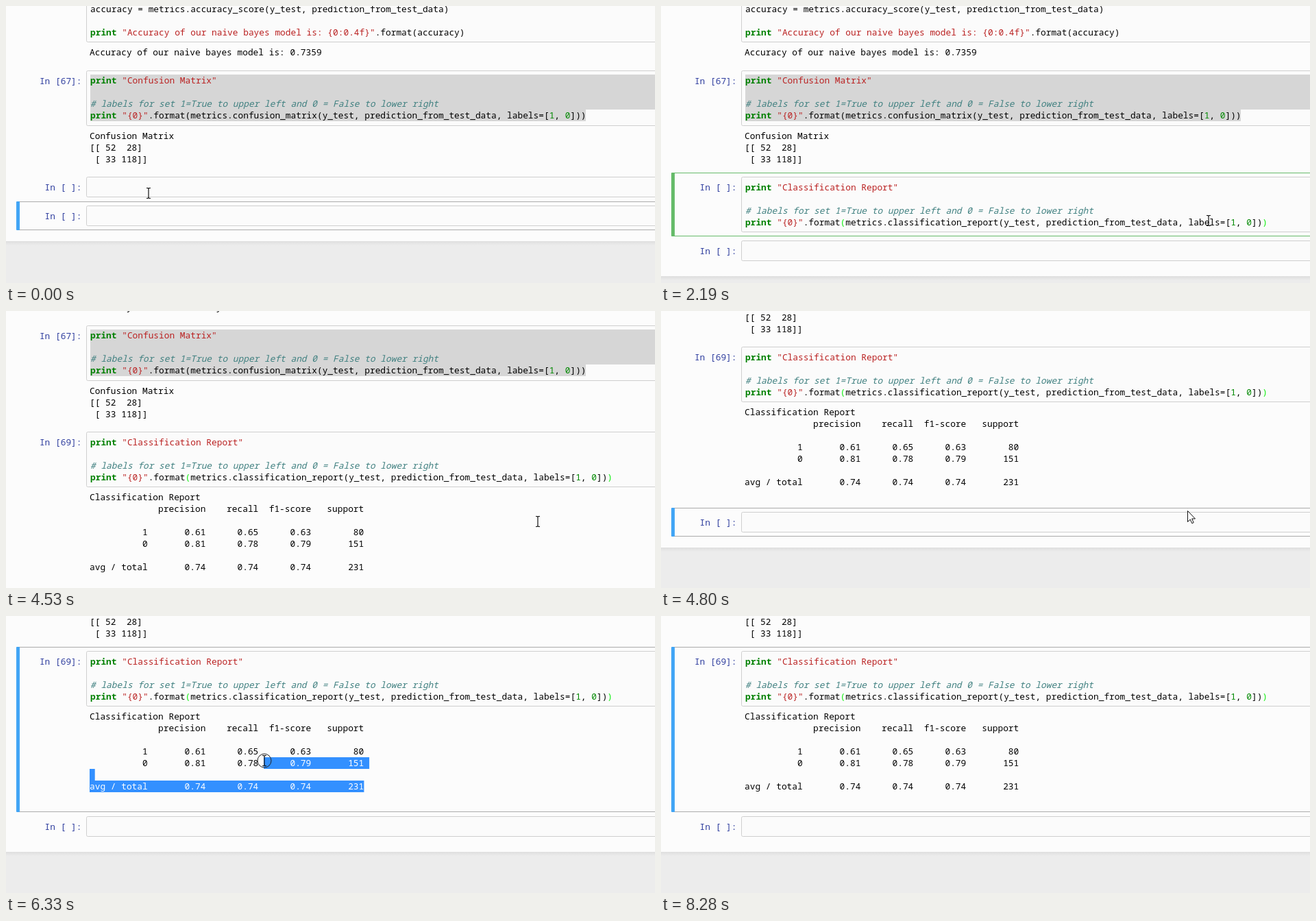
Animation of 947x404 px, one loop 8.69 s. Source, as an HTML page:

```html
<!DOCTYPE html>
<html lang="en">
<head>
<meta charset="utf-8">
<title>Notebook</title>
<style>
  html, body { margin: 0; width: 100%; height: 100%; overflow: hidden; background: #ececec; }
  svg { display: block; width: 947px; height: 404px; }
  text { font: 12.833px "Noto Sans Mono", "DejaVu Sans Mono", monospace; white-space: pre; }
  .prompt { fill: #303f9f; text-anchor: end; }
  .box { fill: #fbfbfb; stroke: #cfcfcf; }
  .k { fill: #008000; font-weight: 700; }
  .s { fill: #ba2121; }
  .c { fill: #408080; font-style: italic; }
  .n { fill: #080; }
  .m { fill: #1e1; }
</style>
</head>
<body>
<svg viewBox="0 0 947 404">
  <defs>
    <linearGradient id="shade" x2="0" y2="1">
      <stop offset="0" stop-color="#dedede"/>
      <stop offset="1" stop-color="#ececec"/>
    </linearGradient>
    <clipPath id="clip"><path class="area"/></clipPath>
    <g id="report">
      <text x="122" y="349">Classification Report</text>
      <text x="122" y="366">             precision    recall  f1-score   support</text>
      <text x="122" y="400">          1       0.61      0.65      0.63        80</text>
      <text x="122" y="417">          0       0.81      0.78      0.79       151</text>
      <text x="122" y="451">avg / total       0.74      0.74      0.74       231</text>
    </g>
  </defs>
  <rect width="947" height="404" fill="#ececec"/>
  <g id="doc">
    <rect id="page" y="-10" width="947" fill="#fcfcfc"/>
    <rect id="shadow" width="947" height="6" fill="url(#shade)"/>

    <rect class="box" x="117.5" y="-40.5" width="900" height="93" rx="2"/>
    <text x="123" y="9">accuracy = metrics.accuracy_score(y_test, prediction_from_test_data)</text>
    <text x="123" y="43"><tspan class="k">print</tspan> <tspan class="s">"Accuracy of our naive bayes model is: {0:0.4f}"</tspan>.format(accuracy)</text>
    <text x="122" y="72">Accuracy of our naive bayes model is: 0.7359</text>

    <rect class="box" x="117.5" y="94.5" width="900" height="80" rx="2"/>
    <path d="M123 100H947V151H846V168H123Z" fill="#d6d6d6"/>
    <text class="prompt" x="110.5" y="114">In [67]:</text>
    <text x="123" y="113"><tspan class="k">print</tspan> <tspan class="s">"Confusion Matrix"</tspan></text>
    <text x="123" y="147" class="c"># labels for set 1=True to upper left and 0 = False to lower right</text>
    <text x="123" y="164"><tspan class="k">print</tspan> <tspan class="s">"{0}"</tspan>.format(metrics.confusion_matrix(y_test, prediction_from_test_data, labels=[<tspan class="n">1</tspan>, <tspan class="n">0</tspan>]))</text>
    <text x="122" y="194">Confusion Matrix</text>
    <text x="122" y="211">[[ 52  28]</text>
    <text x="122" y="228"> [ 33 118]]</text>

    <rect id="frame" x="15.5" width="1000" rx="2" fill="none"/>
    <rect id="bar" x="15" width="5" rx="1"/>

    <rect id="box" class="box" x="117.5" y="249.5" width="900" rx="2"/>
    <text id="count" class="prompt" x="110.5" y="269"></text>
    <g id="typed">
      <text x="123" y="269"><tspan class="k">print</tspan> <tspan class="s">"Classification Report"</tspan></text>
      <text x="123" y="303" class="c"># labels for set 1=True to upper left and 0 = False to lower right</text>
      <text x="123" y="320"><tspan class="k">print</tspan> <tspan class="s">"{0}"</tspan>.format<tspan class="m">(</tspan>metrics.classification_report(y_test, prediction_from_test_data, labels=[<tspan class="n">1</tspan>, <tspan class="n">0</tspan>])<tspan class="m">)</tspan></text>
    </g>
    <rect id="caret" width="1" height="17"/>

    <g id="output">
      <use href="#report"/>
      <path class="area" fill="#3390ff"/>
      <use href="#report" fill="#fff" clip-path="url(#clip)"/>
    </g>

    <g id="last">
      <rect class="box" x="117.5" y=".5" width="900" height="29" rx="2"/>
      <text class="prompt" x="110.5" y="20">In [ ]:</text>
    </g>
  </g>

  <g id="mouse">
    <circle id="press" r="10" fill="none" stroke="#222"/>
    <path id="beam" d="M-3 -7.5H-1L0 -6.5L1 -7.5H3M0 -7V7M-3 7.5H-1L0 6.5L1 7.5H3" fill="none" stroke="#111" stroke-width="1.2"/>
    <path id="arrow" d="M.5 .5V16.5L4.2 13L6.8 18.7L9.2 17.6L6.7 12H11.5Z" fill="#fff" stroke="#111"/>
  </g>
</svg>
<script>
const LOOP = 8690, STEP = 136;
const CHAR = 7.7, LINE = 17, LEFT = 122;
const CELL_TOP = 243, REPORT_TOP = 353, REPORT_HEIGHT = 148;
const CLICK = 700, PASTE = 1250, RUN = 3280, DONE = 3430;
const DRAG = 5760, DROP = 6760, CLEAR = 7040, LEAVE = 8280;

// Key points: start time, end time, position reached
const scrollPath = [[4390, 4530, 73], [4530, 4800, 197], [4800, 4940, 198]];
const mousePath = [
  [0, 280, 213, 265], [CLICK, 980, 380, 298], [PASTE, 2190, 799, 313],
  [3985, 4120, 843, 278], [4120, 4250, 776, 307], [4530, 4800, 768, 291],
  [4800, 5500, 543, 248], [DRAG, 6330, 377, 211], [6330, DROP, 135, 165],
  [DROP, CLEAR, 575, 200], [CLEAR, 7870, 824, 385], [7870, LEAVE, 868, 398]
];

const $ = id => document.getElementById(id);
const areas = document.querySelectorAll(".area");
const show = (el, on) => { el.style.display = on ? "" : "none"; };
const set = (el, attrs) => { for (const k in attrs) el.setAttribute(k, attrs[k]); };
const within = (t, from, to) => t >= from && t < to;

function glide(path, origin, t) {
  let pos = origin;
  for (const [from, to, ...goal] of path) {
    if (t < from) break;
    const steps = Math.round((to - from) / STEP);
    const u = Math.min(1, Math.floor((t - from) / (to - from) * steps + .04) / steps);
    const ease = u * u * (3 - 2 * u);
    pos = pos.map((p, i) => p + (goal[i] - p) * ease);
  }
  return pos;
}
const scrollAt = t => glide(scrollPath, [0], t)[0];
const mouseAt = t => glide(mousePath, [208, 273], t);

// Selected part of the report, from the pointer to the end of the last row.
function selection(t) {
  if (!within(t, DRAG, CLEAR)) return "";
  const [x, y] = mouseAt(Math.min(t, DROP));
  const first = Math.floor((y + scrollAt(t) - REPORT_TOP) / LINE);
  const column = Math.round((x - LEFT) / CHAR);
  let d = "";
  for (let row = first; row < 6; row++) {
    const length = row % 3 === 1 ? 0 : 52;
    const start = row === first ? Math.min(column, length) : 0;
    const end = length + (row < 5 ? 1 : 0);
    const left = LEFT + start * CHAR;
    d += `M${left} ${REPORT_TOP + row * LINE}h${(end - start) * CHAR}v${LINE}H${left}Z`;
  }
  return d;
}

function drawCells(t) {
  const typed = t >= PASTE, done = t >= DONE;
  const editing = within(t, CLICK, RUN);
  const height = (typed ? 4 : 1) * LINE + 12;
  const lastY = CELL_TOP + 19 + height + (done ? REPORT_HEIGHT : 0);
  const lastTop = lastY - 6;
  const onFirst = editing || t >= DRAG;
  const y = onFirst ? CELL_TOP : lastTop;
  const h = onFirst ? lastTop - CELL_TOP : 42;

  $("count").textContent = `In [${t < RUN ? " " : done ? "69" : "*"}]:`;
  set($("box"), { height });
  set($("last"), { transform: `translate(0 ${lastY})` });
  set($("page"), { height: lastY + 62 });
  set($("shadow"), { y: lastY + 52 });
  set($("frame"), { y: y + .5, height: h - 1, stroke: editing ? "#66bb6a" : "#ababab" });
  set($("bar"), { y, height: h, fill: editing ? "#66bb6a" : "#42a5f5" });
  show($("typed"), typed);
  show($("output"), done);

  const blink = Math.floor((t - (typed ? 1160 : CLICK)) / 520) % 2 === 0;
  show($("caret"), blink && within(t, CLICK, 3240));
  set($("caret"), typed ? { x: 885, y: 307 } : { x: 124, y: 257 });
}

function drawMouse(t) {
  const [x, y] = mouseAt(t);
  const overText = y + scrollAt(t) < 484;
  set($("mouse"), { transform: `translate(${Math.round(x)} ${Math.round(y)})` });
  show($("mouse"), t < LEAVE);
  show($("beam"), overText);
  show($("arrow"), !overText);
  show($("press"), within(t, CLICK, CLICK + STEP) || within(t, DRAG, DROP + STEP) || within(t, CLEAR, CLEAR + STEP));
}

function render(t) {
  set($("doc"), { transform: `translate(0 ${-Math.round(scrollAt(t))})` });
  drawCells(t);
  const d = selection(t);
  areas.forEach(a => set(a, { d }));
  drawMouse(t);
}

let start;
function tick(now) {
  start ??= now;
  render((now - start) % LOOP);
  requestAnimationFrame(tick);
}
render(0);
requestAnimationFrame(tick);
</script>
</body>
</html>
```
